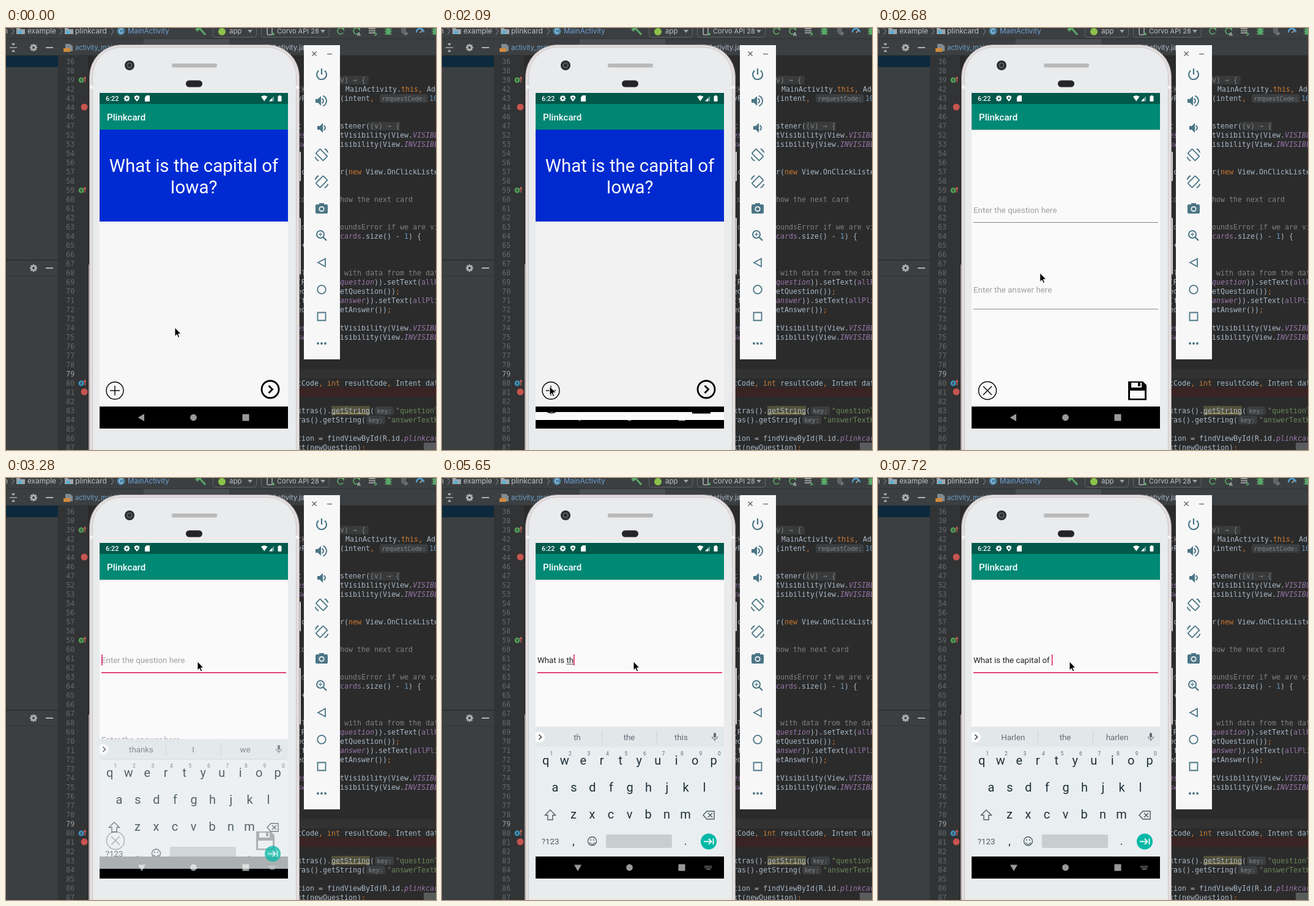
Animation, 703 px wide and 689 px high, one loop 8 s. Source, as an HTML page with a canvas:

```html
<!DOCTYPE html>
<html lang="en">
<head>
<meta charset="utf-8">
<title>Card editor demo</title>
<style>
html, body { margin: 0; width: 100%; height: 100%; overflow: hidden; background: #2b2b2b; }
canvas { display: block; }
</style>
</head>
<body>
<canvas id="stage" width="703" height="689"></canvas>
<script>
const ctx = document.getElementById('stage').getContext('2d');
const LOOP = 8000, STEP = 148.5;
const UI = 'Inter, sans-serif', ROBOTO = 'Roboto, sans-serif', MONO = '"DejaVu Sans Mono", monospace';
const INK = { w: '#a9b7c6', o: '#cc7832', p: '#9876aa', i: '#9876aa', n: '#6897bb', s: '#6a8759', c: '#808080' };
const TITLE = 'Plinkcard';

// ---------- helpers ----------
function rect(x, y, w, h, color) { ctx.fillStyle = color; ctx.fillRect(x, y, w, h); }
function box(x, y, w, h, r, fill, stroke, lw = 1) {
  ctx.beginPath(); ctx.roundRect(x, y, w, h, r); paint(fill, stroke, lw);
}
function disc(x, y, r, fill, stroke, lw = 1) {
  ctx.beginPath(); ctx.arc(x, y, r, 0, Math.PI * 2); paint(fill, stroke, lw);
}
function poly(pts, fill, stroke, lw = 1, closed = true) {
  ctx.beginPath();
  for (let i = 0; i < pts.length; i += 2) ctx.lineTo(pts[i], pts[i + 1]);
  if (closed) ctx.closePath();
  paint(fill, stroke, lw);
}
function line(color, lw, ...pts) { poly(pts, null, color, lw, false); }
function arc(x, y, r, a, b, color, lw) {
  ctx.beginPath(); ctx.arc(x, y, r, a, b); paint(null, color, lw);
}
function paint(fill, stroke, lw) {
  if (fill) { ctx.fillStyle = fill; ctx.fill(); }
  if (stroke) { ctx.strokeStyle = stroke; ctx.lineWidth = lw; ctx.stroke(); }
}
function text(s, x, y, font, color, align = 'left') {
  ctx.font = font; ctx.fillStyle = color; ctx.textAlign = align; ctx.fillText(s, x, y);
}
function gear(x, y, r, color, hole) {
  for (let i = 0; i < 8; i++) {
    const a = i * Math.PI / 4, c = Math.cos(a), s = Math.sin(a);
    line(color, r * .45, x, y, x + c * r, y + s * r);
  }
  disc(x, y, r * .72, color);
  disc(x, y, r * .34, hole);
}
function mix(a, b, u) { return a + (b - a) * u; }
function ease(u) { u = Math.max(0, Math.min(1, u)); return u * u * (3 - 2 * u); }

// ---------- IDE ----------
function code(y, x, ...parts) {
  for (let i = 0; i < parts.length; i += 2) {
    const kind = parts[i], s = parts[i + 1];
    text(s, x, y + 4, (kind === 'i' ? 'italic ' : '') + '11.63px ' + MONO, INK[kind]);
    x += s.length * 7;
  }
}
function pill(x, y, w, s) {
  box(x, y - 7, w, 14, 4, '#3b3d3f');
  text(s, x + w / 2, y + 3.5, '10px ' + MONO, '#868a8d', 'center');
}
function folder(x) {
  poly([x, 0, x + 5, 0, x + 7, 2, x + 14, 2, x + 14, 10, x, 10], '#9aa7b0');
  rect(x + 3, 5, 5, 4, '#40b6e0');
}
function crumb(x) { line('#8a8d8f', 1, x, 0, x + 4, 5, x, 11); }
function down(x) { poly([x - 4, 3, x + 4, 3, x, 8], '#9fa2a4'); }
function bug(x) {
  box(x - 4, 0, 8, 11, 4, '#59a869');
  for (const y of [2, 6, 10]) line('#59a869', 1.3, x - 6, y, x + 6, y);
}
function reload(x, letter) {
  arc(x, 5, 5, .6, 5.2, '#59a869', 1.7);
  poly([x + 1, 0, x + 6, 0, x + 6, 5], '#59a869');
  if (letter) text('A', x + 1, 13, 'bold 8px ' + UI, '#afb1b3');
}

function topBar() {
  rect(0, 0, 703, 17, '#3c3f41');
  rect(0, 17, 703, 1, '#2f3133');
  const f = '12px ' + UI, c = '#bfc1c3';
  text('n', -4, 9, f, c); crumb(9); folder(17);
  text('example', 35, 9, '11.8px ' + UI, c); crumb(88); folder(96);
  text(TITLE.toLowerCase(), 113, 9, f, c); crumb(172);
  disc(188, 5, 6.5, '#4a86a8'); text('C', 188, 9, '10px ' + UI, '#d4e4ee', 'center');
  text('MainActivity', 199, 9, '11.6px ' + UI, '#6da0d6');
  line('#59a869', 3, 316, 0, 326, 11); line('#59a869', 5, 311, 4, 318, -2);
  box(338.5, -8, 71, 23, 4, null, '#626567');
  disc(353, 6, 6, '#8cc24a');
  text('app', 365, 9, '11.5px ' + UI, c); down(399);
  box(417.5, -8, 111, 23, 4, null, '#626567');
  box(427, -2, 8, 13, 1, null, '#afb1b3', 1.5); disc(437, 10, 2, '#59a869');
  text('Corvo API 28', 443, 9, '11px ' + UI, c); down(518);
  reload(547); reload(573, true);
  for (const y of [1, 4.5, 8]) line('#afb1b3', 1.6, 593, y, 604, y);
  line('#59a869', 1.5, 602, 6, 606, 10, 602, 12);
  bug(625);
  poly([646, -1, 654, -1, 654, 7, 650, 11, 646, 7], '#626567'); poly([652, 5, 658, 9, 652, 13], '#737678');
  arc(677, 7, 6, 3.1, 6.3, '#4c9fd0', 2.5); line('#afb1b3', 1.6, 677, 8, 681, 3);
  bug(702);
}

function sidePanel() {
  rect(0, 18, 85, 671, '#3c3f41');
  rect(0, 45, 85, 19, '#0d293e');
  rect(0, 44, 85, 1, '#323537'); rect(0, 378, 85, 2, '#2d2f31'); rect(0, 404, 85, 1, '#323537');
  line('#afb1b3', 1.4, 6, 32, 18, 32);
  poly([9, 25, 15, 25, 12, 29], '#afb1b3'); poly([9, 39, 15, 39, 12, 35], '#afb1b3');
  for (const y of [32, 392]) {
    gear(45, y, 6, '#afb1b3', '#3c3f41');
    rect(65, y - 1, 12, 2, '#afb1b3');
  }
}

function tabs() {
  rect(85, 18, 618, 26, '#3c3f41');
  rect(225, 18, 140, 26, '#4b4f51');
  rect(85, 44, 618, 1, '#323537');
  poly([97, 26, 105, 26, 109, 30, 109, 38, 97, 38], '#7f8b91');
  rect(94, 33, 11, 6, '#d08a3c');
  text('activity_main.xml', 113, 36, '11px ' + UI, '#6c9fc8');
  text('MainActivity.java', 409, 36, '11.5px ' + UI, '#a9b7c6');
}

function gutter() {
  rect(85, 45, 49, 644, '#313335');
  const skips = [36, 38, 39, 42, 43, 44, 46, 47, 52, 53, 54, 56, 57, 58];
  for (let i = 0; i < 43; i++) {
    const n = i < 14 ? skips[i] : i + 45;
    text(n, 112, 59 + i * 15, '11.4px ' + MONO, n === 79 ? '#a4a3a3' : '#666a6d', 'right');
  }
  for (const [y, c] of [[85, '#4f9a55'], [265, '#4f9a55'], [580, '#3f8fb8']]) {
    disc(123, y, 4.5, c); rect(122.3, y - 2, 1.4, 4, '#2b2b2b');
    line('#d0605b', 1.3, 129, y + 4, 129, y - 5); line('#d0605b', 1.3, 127, y - 2, 129, y - 5, 131, y - 2);
  }
  disc(128, 129, 5.5, '#c75450'); disc(128, 594, 5.5, '#c75450');
}

function editor() {
  rect(85, 45, 618, 644, '#2b2b2b');
  rect(134, 557, 569, 15, '#323232');
  rect(134, 587, 569, 15, '#3a2323');
  gutter();
  box(539, 78, 54, 14, 3, '#383a3b');
  code(85, 546, 'c', 'v) → {');
  code(100, 476, 'c', 'ck');
  code(100, 555, 'w', 'MainActivity.', 'o', 'this', 'o', ', ', 'w', 'Add');
  code(115, 476, 'w', 'yF');
  code(115, 546, 'w', '(intent', 'o', ',');
  pill(611, 115, 79, 'requestCode:'); code(115, 692, 'n', '100');
  code(160, 476, 'w', 't');
  code(160, 546, 'w', 'stener(');
  box(594, 153, 50, 14, 3, '#383a3b'); code(160, 595, 'c', '(v) → {');
  for (const y of [175, 490]) {
    code(y, 476, 'i', 'es');
    code(y, 546, 'w', 'tVisibility(View.', 'i', 'VISIBLE');
    code(y + 15, 476, 'i', 'sw');
    code(y + 15, 546, 'w', 'isibility(View.', 'i', 'INVISIBLE');
  }
  code(235, 476, 'w', 'ic');
  code(235, 546, 'w', 'r(', 'o', 'new ', 'w', 'View.OnClickListen');
  code(280, 476, 'c', 'to'); code(280, 546, 'c', 'how the next card');
  code(325, 476, 'c', 'nd'); code(325, 546, 'c', 'oundsError if we are vie');
  code(340, 546, 'p', 'cards', 'w', '.size() - ', 'n', '1', 'w', ') {');
  code(355, 476, 'w', ' +');
  code(400, 476, 'c', 'eT'); code(400, 546, 'c', ' with data from the data');
  code(415, 476, 'w', '(R'); code(415, 546, 'i', 'question', 'w', ')).setText(', 'p', 'allPli');
  code(430, 476, 'w', 'ed'); code(430, 546, 'w', 'etQuestion())', 'o', ';');
  code(445, 476, 'w', '(f'); code(445, 546, 'i', 'answer', 'w', ')).setText(', 'p', 'allPlin');
  code(460, 476, 'w', 'ed'); code(460, 546, 'w', 'etAnswer())', 'o', ';');
  code(580, 476, 'w', 'tCode', 'o', ', int ', 'w', 'resultCode', 'o', ', ', 'w', 'Intent data');
  rect(532, 617, 63, 15, '#52503a');
  code(625, 476, 'w', 'xtras().getString(');
  rect(532, 629, 63, 1, '#a9a06a');
  pill(603, 625, 31, 'key:'); code(625, 637, 's', '"questionText');
  code(640, 462, 'w', 'xtras().getString(');
  pill(589, 640, 31, 'key:'); code(640, 623, 's', '"answerTextKe');
  code(670, 476, 'w', 'tion = findViewById(R.id.', 'i', TITLE.toLowerCase());
  code(685, 476, 'w', 'xt(newQuestion)', 'o', ';');
  rect(683, 677, 20, 12, '#595b5d');
}

// ---------- emulator shell ----------
function phone() {
  box(479, 202, 3, 48, 1, '#d8d6d6'); box(479, 310, 3, 92, 1, '#d8d6d6');
  rect(135, 386, 4, 303, '#b5b0b0');
  box(136.5, 27.5, 343, 740, 52, '#e4dedf', '#a39c9d', 1);
  box(141.5, 31.5, 333, 740, 47, '#e9ebed', '#c9c5c6', 1);
  rect(137, 94, 5, 5, '#f3f3f3'); rect(474, 94, 5, 5, '#f3f3f3');
  disc(202, 61, 8, '#2c2d2f'); disc(202, 61, 4.8, '#54575a'); disc(202, 61, 2.4, '#222426');
  box(271, 58, 74, 6.5, 2, '#b9b9ba');
  box(294, 85.5, 27, 11, 5.5, '#252527');
}

function rotateIcon(y, dir) {
  ctx.save();
  ctx.translate(516, y); ctx.scale(dir, 1); ctx.rotate(Math.PI / 4);
  box(-8.5, -5, 17, 10, 1, null, '#4b7686', 1.8);
  arc(0, 0, 11, -1.9, -1.1, '#4b7686', 1.8);
  arc(0, 0, 11, 1.24, 2.04, '#4b7686', 1.8);
  ctx.restore();
}
function speaker(x, y) {
  poly([x, y - 3, x + 4, y - 3, x + 9, y - 8, x + 9, y + 8, x + 4, y + 3, x, y + 3], '#4b7686');
  arc(x + 9, y, 4, -1.2, 1.2, '#4b7686', 2);
}
function toolbar() {
  const c = '#4b7686', x = 516;
  rect(487, 28, 59, 513, '#f7f7f7');
  line('#566066', 1.2, 500.5, 38.5, 507.5, 45.5); line('#566066', 1.2, 507.5, 38.5, 500.5, 45.5);
  line('#566066', 1.2, 525, 42.5, 533, 42.5);
  arc(x, 76, 8, -.9, 4.05, c, 2.2); line(c, 2.2, x, 66, x, 76);
  speaker(506, 119); arc(515, 119, 9, -1.2, 1.2, c, 2);
  speaker(509, 163);
  rotateIcon(207, 1); rotateIcon(251, -1);
  box(506, 288, 20, 15, 2, c); rect(512, 286, 8, 4, c);
  disc(x, 295.5, 4.5, '#f7f7f7'); disc(x, 295.5, 2.8, c);
  disc(514, 337, 6, null, c, 2); line(c, 2.4, 518, 341, 524, 347);
  line(c, 1.2, 511, 337, 517, 337); line(c, 1.2, 514, 334, 514, 340);
  poly([510, 383, 522, 376.5, 522, 389.5], null, c, 1.8);
  disc(x, 427, 6.8, null, c, 1.8);
  box(509.5, 464.5, 13, 13, 0, null, c, 1.8);
  for (const d of [-6, 0, 6]) disc(x + d, 515, 2, c);
}

// ---------- phone screens ----------
function frame(bg) {
  rect(153, 106, 308, 548, bg);
  rect(153, 106, 308, 18, '#00594b');
  rect(153, 124, 308, 42, '#008975');
  text(TITLE, 165, 151, '500 15.1px ' + ROBOTO, '#fff');
  rect(153, 618, 308, 36, '#000');
}
function mainPage() {
  frame('#f7f7f7');
  rect(153, 166, 308, 150, '#002bd3');
  const f = '29.5px ' + ROBOTO;
  text('What is the capital of', 307, 235, f, '#fff', 'center');
  text('Iowa?', 307, 270, f, '#fff', 'center');
  disc(178, 592, 14, null, '#000', 1.4);
  line('#000', 1.4, 170, 592, 186, 592); line('#000', 1.4, 178, 584, 178, 600);
  disc(432, 590, 14, null, '#000', 2.8);
  line('#000', 2.8, 429.5, 584, 435.5, 590, 429.5, 596);
}
function saveIcon() {
  poly([409, 577, 433, 577, 439, 583, 439, 607.5, 409, 607.5], '#000');
  rect(414, 579, 17, 8, '#fafafa'); rect(425, 579, 4, 6, '#000');
  rect(412, 592, 24, 13, '#fafafa');
}
function addPage(typed, focus) {
  frame('#fafafa');
  rect(153, 166, 308, 1, 'rgba(0,0,0,.12)'); rect(153, 167, 308, 1, 'rgba(0,0,0,.05)');
  const f = '13.3px ' + ROBOTO;
  text(typed || 'Enter the question here', 156, 302, f, typed ? '#212121' : '#9f9f9f');
  if (focus) {
    rect(156, 317, 302, 1.6, '#d81b60');
    const w = ctx.measureText(typed).width;
    const head = ctx.measureText(typed.slice(0, typed.lastIndexOf(' ') + 1)).width;
    if (w > head) rect(156 + head, 303.5, w - head, 1, '#444');
    rect(156 + w, 288, 1.6, 18, '#e0246a');
  } else rect(156, 317, 302, 1, '#858585');
  text('Enter the answer here', 156, 432, f, '#9f9f9f');
  rect(156, 458.5, 302, 1, '#858585');
  disc(179, 592, 14.5, null, '#000', 1.4);
  line('#000', 1.4, 172, 585, 186, 599); line('#000', 1.4, 186, 585, 172, 599);
  saveIcon();
}

function statusIcons() {
  const w = '#fff';
  text('6:22', 163, 119, '500 10.8px ' + ROBOTO, w);
  gear(197.5, 115, 4.8, w, '#00594b');
  poly([210, 111.5, 214, 110, 218, 111.5, 218, 115, 214, 120, 210, 115], w);
  disc(214, 114.5, 1.5, '#00594b');
  poly([230, 110, 235, 110, 235, 120, 227, 120, 227, 113], w);
  poly([417, 112, 422, 110, 427.5, 112, 422.3, 119.5], w);
  poly([430, 119.5, 438, 119.5, 438, 111], '#6fa69d'); poly([430, 119.5, 435, 119.5, 435, 114.5], w);
  box(444.5, 111, 6, 9, 1, w); rect(446, 110, 3, 1, w);
}
function navIcons(keys) {
  const c = 'rgba(255,255,255,.6)';
  poly(keys ? [216, 631.5, 228, 631.5, 222, 642] : [215.5, 636, 226, 630, 226, 642], c);
  disc(306.5, 636, 5.4, c); rect(386.5, 630.5, 11, 11, c);
  if (!keys) return;
  for (let i = 0; i < 10; i++) rect(429.5 + (i % 5) * 2.4, 633 + (i > 4) * 2.5, 1.5, 1.5, c);
  rect(432, 638, 7, 1.3, c);
}

function keyRow(s, x, y) {
  [...s].forEach((ch, i) => text(ch, x + i * 30.5, y, '20px ' + ROBOTO, '#1f3037', 'center'));
}
function keyboard(hints) {
  const dim = '#5d6c73', dark = '#4b5b62';
  rect(153, 406, 308, 212, '#e9eef1');
  rect(153, 406, 308, 33, '#e2e7ea');
  rect(261, 413, 1, 20, '#cbd1d4'); rect(351, 413, 1, 20, '#cbd1d4');
  ctx.save();
  ctx.beginPath(); ctx.rect(153, 406, 308, 33); ctx.clip();
  disc(159, 423, 9, '#fff');
  ctx.restore();
  line('#333', 1.5, 158.5, 419, 162.5, 423, 158.5, 427);
  hints.forEach((s, i) => text(s, 221 + i * 85, 428, '13.3px ' + ROBOTO, dim, 'center'));
  box(444, 416, 4, 8, 2, dim); arc(446, 422, 4.3, 0, Math.PI, dim, 1.2); line(dim, 1.2, 446, 426, 446, 429.5);
  keyRow('qwertyuiop', 169.7, 468);
  [...'1234567890'].forEach((d, i) => text(d, 179 + i * 30.5, 453, '8.5px ' + ROBOTO, dim, 'center'));
  keyRow('asdfghjkl', 185, 512);
  keyRow('zxcvbnm', 215, 556);
  poly([177, 542, 185.5, 550.5, 181, 550.5, 181, 558, 173, 558, 173, 550.5, 168.5, 550.5], null, dark, 1.4);
  poly([427, 550.5, 433, 544, 445, 544, 445, 557, 433, 557], null, dark, 1.4);
  line(dark, 1.4, 435, 547, 442, 554); line(dark, 1.4, 442, 547, 435, 554);
  text('?123', 177, 598, '13.3px ' + ROBOTO, dark, 'center');
  text(',', 215, 599, '18px ' + ROBOTO, '#1f3037', 'center');
  text('.', 398, 599, '18px ' + ROBOTO, '#1f3037', 'center');
  disc(245.5, 593, 7, null, dark, 1.3); arc(245.5, 594, 4, .2, 2.94, dark, 1.3);
  disc(243, 591, 1.1, dark); disc(248, 591, 1.1, dark);
  box(268, 582, 108, 22, 3, '#c8cdd0');
}
function enterKey() {
  disc(436, 593.5, 13, '#00b8a6');
  line('#fff', 1.8, 428, 593.5, 440, 593.5); line('#fff', 1.8, 436, 589, 440.5, 593.5, 436, 598);
  line('#fff', 1.8, 443.5, 588.5, 443.5, 598.5);
}
// The sliding keyboard is hidden behind a pale strip where it overlaps the navigation bar.
function slideKeyboard(hints, drop, alpha) {
  ctx.save();
  ctx.globalAlpha = alpha;
  ctx.save();
  ctx.beginPath(); ctx.rect(153, 406, 308, 212); ctx.clip();
  ctx.translate(0, drop);
  keyboard(hints);
  ctx.restore();
  rect(153, 618, 308, drop, '#e9eef1');
  ctx.translate(0, drop);
  enterKey();
  ctx.restore();
}

// ---------- timeline ----------
const SENTENCE = 'What is the capital of ';
// step, letters typed, suggestions
const TYPING = [
  [21, 0, 'thanks I we'], [27, 1, 'W We Who'], [29, 2, 'Wh What Where'], [30, 4, 'What What\'s Whatever'],
  [32, 5, 'is the are'], [33, 6, 'i is in'], [34, 7, 'is is isn\'t'], [35, 8, 'the a your'], [36, 9, 't the that'],
  [38, 10, 'th the this'], [39, 11, 'the they there'], [40, 12, 'best name same'], [41, 13, 'c chance code'],
  [42, 14, 'ca cause case'], [43, 15, 'cap cap capital'], [44, 17, 'capit capital capitol'],
  [45, 18, 'capita capital capitals'], [47, 19, 'capital capital capitals'], [48, 20, 'of in and'],
  [49, 21, 'o of on'], [50, 22, 'of of off'], [52, 23, 'Harlen the harlen']
];
const OPENING = [ // shift of the new page, its clip top, shift and shade of the old one
  [22, 627, 0, .02], [8, 158, -6.5, .12], [2, 106, -10, .15]
];
const KEYS_IN = [[20, .74], [5, .95]];

function mouse(k) {
  const a = ease((k - 2) / 5), b = ease((k - 15) / 5);
  const x = mix(mix(276, 176, a), 313, b), y = mix(mix(489, 585, a), 299.5, b);
  const p = [0, 0, 0, 14.5, 3.3, 11.5, 5.5, 16.5, 7.8, 15.5, 5.6, 10.6, 10, 10.3];
  poly(p.map((v, i) => v + (i % 2 ? y : x)), '#000', '#fff', 1);
}

function screen(k) {
  ctx.save();
  ctx.beginPath(); ctx.rect(153, 106, 308, 548); ctx.clip();
  const state = TYPING.filter(s => s[0] <= k).pop();
  const opening = OPENING[k - 14];
  if (k < 14) mainPage();
  else if (opening) {
    const [shift, top, back, shade] = opening;
    ctx.save(); ctx.translate(0, back); mainPage(); ctx.restore();
    rect(153, 106, 308, 548, `rgba(0,0,0,${shade})`);
    ctx.save();
    ctx.beginPath(); ctx.rect(153, top, 308, 654 - top); ctx.clip();
    ctx.translate(0, shift); addPage('', false);
    ctx.restore();
    if (top < 124) rect(153, 106, 308, 18, '#00594b');
  } else addPage(state ? SENTENCE.slice(0, state[1]) : '', !!state);
  const keys = k > 21;
  if (keys) slideKeyboard(state[2].split(' '), ...(KEYS_IN[k - 22] || [0, 1]));
  statusIcons();
  navIcons(keys);
  ctx.restore();
}

function draw(k) {
  topBar(); editor(); sidePanel(); tabs();
  phone(); toolbar();
  screen(k);
  mouse(k);
}

const start = performance.now();
let last = -1;
function tick() {
  const t = (performance.now() - start) % LOOP;
  const k = Math.floor((t + 4) / STEP);
  if (k !== last) draw(last = k);
  requestAnimationFrame(tick);
}
tick();
</script>
</body>
</html>
```
